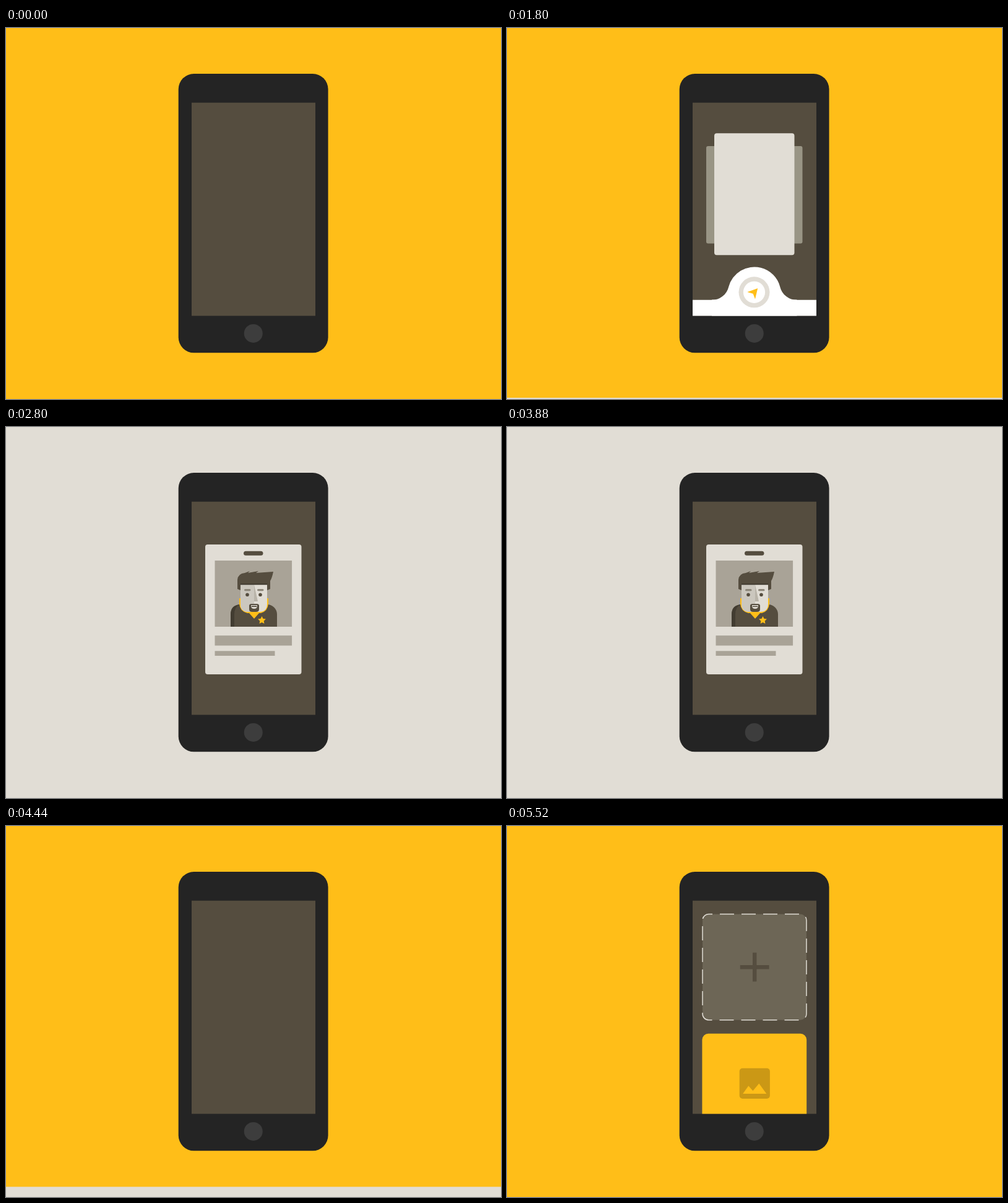
Recreate the animation shown at these times as an HTML page with a canvas. Size 800 px wide and 600 px high, loop 6.32 s.

```html
<!DOCTYPE html>
<html lang="en">
<head>
<meta charset="utf-8">
<title>Phone cards</title>
<style>
html, body { margin: 0; width: 100%; height: 100%; overflow: hidden; background: #ffbe18; }
canvas { display: block; width: 800px; height: 600px; }
</style>
</head>
<body>
<canvas id="stage" width="800" height="600"></canvas>
<script>
const ctx = document.getElementById('stage').getContext('2d');
const LOOP = 6320;
const CX = 399.75;
const YELLOW = '#ffbe18', BEIGE = '#e1ddd5', BROWN = '#554d3f', GREY = '#a9a397',
      SHELL = '#242424', WHITE = '#ffffff';

// Cubic ease in and out between two times.
function ease(t, start, end) {
  const u = Math.min(1, Math.max(0, (t - start) / (end - start)));
  return u < 0.5 ? 4 * u ** 3 : 1 - 4 * (1 - u) ** 3;
}
const mix = (a, b, p) => a + (b - a) * p;

function rect(color, x, y, w, h, r = 0) {
  if (w <= 0 || h <= 0) return;
  ctx.fillStyle = color;
  ctx.beginPath();
  ctx.roundRect(x, y, w, h, r);
  ctx.fill();
}
function circle(color, x, y, r) {
  ctx.fillStyle = color;
  ctx.beginPath();
  ctx.arc(x, y, r, 0, Math.PI * 2);
  ctx.fill();
}
function poly(color, points) {
  ctx.fillStyle = color;
  ctx.beginPath();
  points.forEach(([x, y]) => ctx.lineTo(x, y));
  ctx.closePath();
  ctx.fill();
}
function shape(color, d) {
  ctx.fillStyle = color;
  ctx.fill(new Path2D(d));
}
function clipped(x, y, w, h, draw) {
  if (w <= 0 || h <= 0) return;
  ctx.save();
  ctx.beginPath();
  ctx.rect(x, y, w, h);
  ctx.clip();
  draw();
  ctx.restore();
}
function shifted(dy, draw) {
  ctx.save();
  ctx.translate(0, dy);
  draw();
  ctx.restore();
}

function drawBackground(t) {
  rect(YELLOW, 0, 0, 800, 600);
  const rise = 600 * (1 - ease(t, 1756, 2227));
  const drop = 600 * ease(t, 4108, 4519);
  const top = Math.max(rise, drop);
  rect(BEIGE, 0, top, 800, 600 - top);
}

function drawBump() {
  const a = 0.249, half = Math.PI / 2;
  ctx.fillStyle = WHITE;
  ctx.beginPath();
  ctx.arc(331, 412, 28, half, a, true);
  ctx.arc(CX, 429.5, 43, Math.PI + a, -a);
  ctx.arc(468.5, 412, 28, Math.PI - a, half, true);
  ctx.closePath();
  ctx.fill();
  rect(WHITE, 331, 439.5, 137.5, 30);
  circle(BEIGE, 399.5, 427.3, 25);
  circle(WHITE, 399.5, 427.3, 17.6);
  poly(YELLOW, [[405.2, 421], [388.3, 427], [397.7, 429.7], [401, 438.5]]);
}

function drawNav(t) {
  const bar = ease(t, 30, 290) * (1 - ease(t, 1963, 2383));
  const bump = ease(t, 150, 490) * (1 - ease(t, 1790, 2110));
  const dy = 26 * (1 - bar);
  if (bar <= 0) return;
  rect(WHITE, 300, 439.7 + dy, 200, 30);
  if (bump > 0) shifted(dy + 70 * (1 - bump), drawBump);
}

function drawSideCards(t) {
  const p = ease(t, 520, 765) * (1 - ease(t, 1963, 2383));
  if (p <= 0 || t > 2400) return;
  const w = mix(90, 155.5, p), h = mix(0, 157.5, p);
  rect('#999585', CX - w / 2, 269.8 - h / 2, w, h, 3);
}

function drawMainCard(t) {
  const grow = ease(t, 30, 450);
  const morph = ease(t, 1963, 2383);
  const w = mix(129.5, 155.5, morph) * grow;
  const h = mix(197, 210, morph) * grow;
  const y = mix(268.7, 295, morph) - 345 * ease(t, 4183, 4583);
  rect(BEIGE, CX - w / 2, y - h / 2, w, h, 4 * grow);
}

function drawStar(x, y, r) {
  const points = Array.from({ length: 10 }, (_, i) => {
    const a = i * Math.PI / 5 - Math.PI / 2, d = i % 2 ? r * 0.5 : r;
    return [x + d * Math.cos(a), y + d * Math.sin(a)];
  });
  poly(YELLOW, points);
}

function drawPerson() {
  rect(BROWN, 363, 287, 75, 60, 16);
  shape('#423c31', 'M363 325V303Q363 288 378 287Q369 291 369 303V325Z');
  shape(YELLOW, 'M377 277V286Q378 298 390 301H393L401 310L409 301H412Q423 298 424 286V277Z');
  // Face with its shaded half
  shape(BEIGE, 'M379 252H422V286Q422 299 409 299H392Q379 299 379 286Z');
  shape('#cbc7be', 'M379 252H401V299H392Q379 299 379 286Z');
  shape('#b9b4a9', 'M401 255V282H407Z');
  // Hair
  shape(BROWN, 'M374 262V247Q375 237 386 236L394 233L391 236L408 233L404 236L432 234'
    + 'Q430 244 427 249V262L422 264V255H379V264Z');
  rect('#3f392f', 379, 253.5, 43, 1.7);
  for (const x of [390, 411]) {
    rect('#8d877a', x - 5, 262, 10.5, 3.2, 1.6);
    circle(BROWN, x, 271.2, 2.8);
  }
  // Beard and mouth
  shape(BROWN, 'M393 289Q393 286 397 286H405Q409 286 409 289V295Q409 299 404 299H398Q393 299 393 295Z');
  shape(BEIGE, 'M396 288H406V290.5Q405 294 401 294Q397 294 396 290.5Z');
  rect(BROWN, 396.5, 289.3, 9, 1.7, 0.8);
  drawStar(413.5, 312.6, 6.7);
}

function drawBadge(t) {
  const slot = ease(t, 2420, 2660) * (1 - ease(t, 4019, 4339));
  const wipe = ease(t, 2425, 2720) * (1 - ease(t, 4054, 4354));
  const person = ease(t, 2500, 2810) * (1 - ease(t, 3865, 4130));
  rect(BROWN, CX - 15.7 * slot, 204.3 - 3.5 * slot, 31.4 * slot, 7 * slot, 3.5 * slot);
  clipped(337.3, 190, 125 * wipe, 210, () => {
    rect(GREY, 337.3, 216, 125, 107);
    rect(GREY, 337.3, 337.2, 125, 16.3);
    rect(GREY, 337.3, 362.2, 97.2, 7.8);
    if (person > 0) {
      clipped(337.3, 216, 125, 107, () => shifted(92 * (1 - person), drawPerson));
    }
  });
}

function drawDropZone() {
  ctx.fillStyle = '#6d6656';
  ctx.strokeStyle = BEIGE;
  ctx.lineWidth = 1.5;
  ctx.setLineDash([23, 12]);
  ctx.lineDashOffset = -18;
  ctx.beginPath();
  ctx.roundRect(316, 142.5, 168, 171.3, 10);
  ctx.fill();
  ctx.stroke();
  rect(BROWN, 376.8, 225, 46.8, 6.4);
  rect(BROWN, 397, 204.8, 6.4, 46.8);
}

function drawPictureCard() {
  rect(YELLOW, 315.4, 335.8, 168.8, 172, 10);
  rect('#cb9815', 375.7, 391.7, 49.2, 49.2, 5);
  poly(YELLOW, [[381.2, 433], [390.3, 420.3], [397.4, 428.3], [407.3, 416.5], [419.3, 433]]);
}

function drawFeed(t) {
  const zone = ease(t, 4422, 4982), picture = ease(t, 4920, 5530);
  if (zone > 0) shifted(326 * (1 - zone), drawDropZone);
  if (picture > 0) shifted(131 * (1 - picture), drawPictureCard);
}

function drawPhone(t) {
  rect(SHELL, 278.7, 74, 241.9, 451.3, 25);
  rect(BROWN, 300, 120.7, 200, 344.8);
  circle('#3d3d3d', CX, 493.9, 15);
  clipped(300, 120.7, 200, 344.8, () => {
    drawNav(t);
    drawSideCards(t);
    drawMainCard(t);
    drawBadge(t);
    drawFeed(t);
  });
}

const begin = performance.now();
function frame() {
  const t = (performance.now() - begin) % LOOP;
  drawBackground(t);
  drawPhone(t);
  requestAnimationFrame(frame);
}
frame();
</script>
</body>
</html>
```
